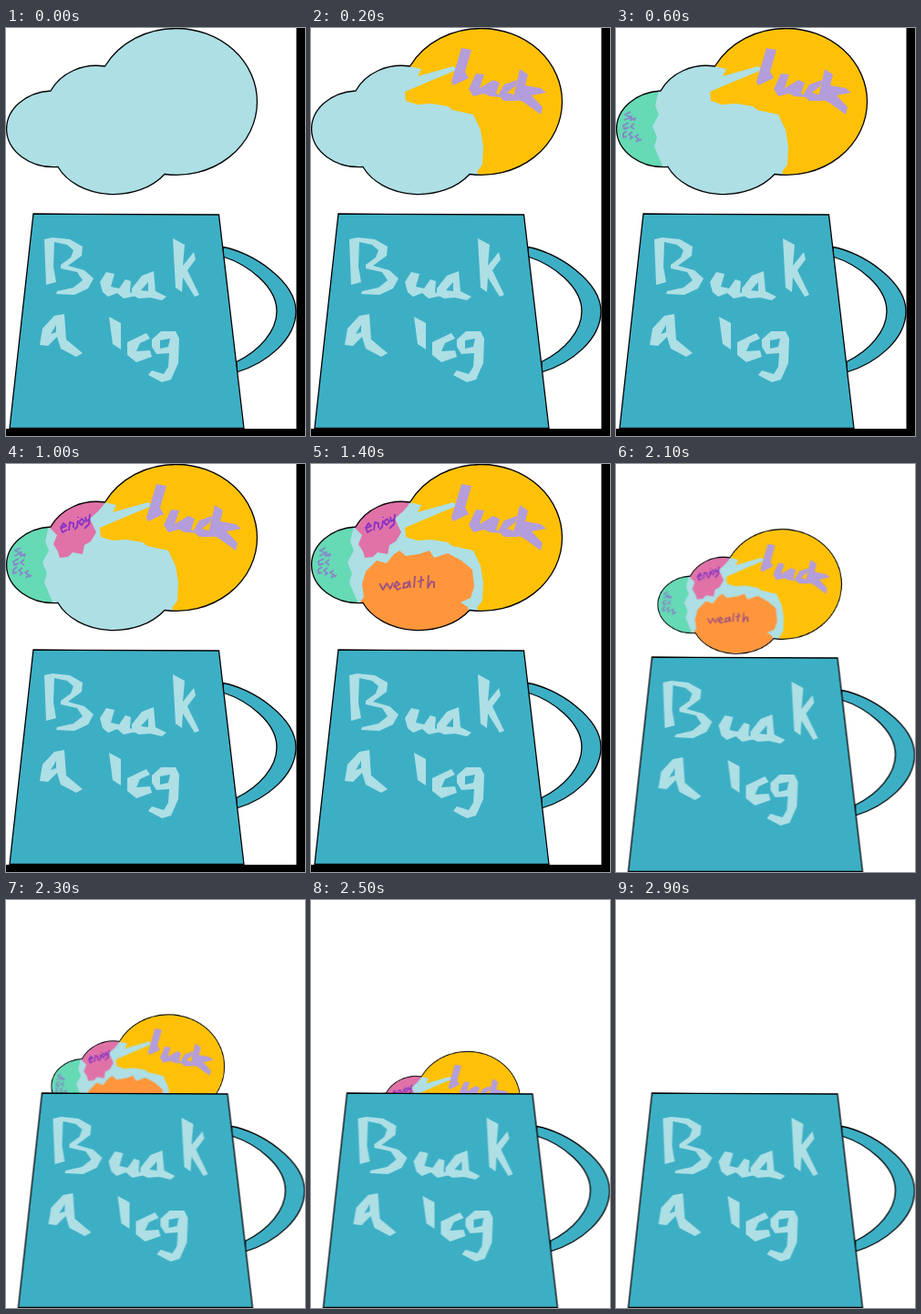
An HTML page without scripts that plays this animation: 328x448 px, repeating every 3100 ms.

```html
<!DOCTYPE html>
<html lang="en">
<head>
<meta charset="utf-8">
<title>Mug and cloud</title>
<style>
  html, body { margin: 0; width: 100%; height: 100%; overflow: hidden; background: #fff; }
  svg { display: block; width: 328px; height: 448px; }

  .line { fill: none; stroke: #000; stroke-width: 1.3; vector-effect: non-scaling-stroke; }
  .mug { fill: #3dafc5; stroke: #000; stroke-width: 1.3; }
  .pale { fill: #addfe5; }
  .pen { fill: none; stroke-width: 1.9; stroke-linejoin: round; }

  .cloud, .cup, .bars, .luck, .success, .enjoy, .wealth { animation: 3.1s step-end infinite; }
  .cloud { animation-name: sink; }
  .cup { animation-name: shift; }
  .bars { animation-name: bars; }
  .luck { animation-name: luck; }
  .success { animation-name: success; }
  .enjoy { animation-name: enjoy; }
  .wealth { animation-name: wealth; }

  @keyframes luck { 0% { opacity: 0 } 6.451%, 100% { opacity: 1 } }
  @keyframes success { 0% { opacity: 0 } 19.354%, 100% { opacity: 1 } }
  @keyframes enjoy { 0% { opacity: 0 } 32.258%, 100% { opacity: 1 } }
  @keyframes wealth { 0% { opacity: 0 } 45.161%, 100% { opacity: 1 } }
  @keyframes bars { 0% { opacity: 1 } 61.29%, 100% { opacity: 0 } }
  @keyframes shift {
    0% { transform: translate(0, 0) }
    61.29%, 100% { transform: translate(9.5px, 8px) }
  }
  @keyframes sink {
    0% { transform: translate(0, 0) scale(1, 1) }
    61.29% { transform: translate(48px, 30.5px) scale(.733, .75) }
    67.741% { transform: translate(45.5px, 71.3px) scale(.733, .75) }
    74.193% { transform: translate(49.5px, 125.5px) scale(.69, .71) }
    80.645% { transform: translate(50.5px, 166px) scale(.65, .667) }
    87.096% { transform: translate(56px, 202.5px) scale(.6, .61) }
    93.548%, 100% { transform: translate(60px, 240px) scale(.55, .57) }
  }
</style>
</head>
<body>
<svg viewBox="0 0 328 448" role="img" aria-label="Buak a leg: luck, success, enjoy, wealth">
  <defs>
    <path id="puff" d="M49 69A56 50 0 0 1 108.5 42A88.5 80.5 0 0 1 187 .5A88.5 80.5 0 0 1 275.5 81A88.5 80.5 0 0 1 174 160.500A67 50 0 0 1 57 152.500A52 42 0 0 1 .6 111A52 42 0 0 1 49 69Z"/>
    <clipPath id="inside"><use href="#puff"/></clipPath>
  </defs>

  <g class="cloud">
    <use href="#puff" class="pale"/>
    <g clip-path="url(#inside)">
      <g class="luck">
        <path fill="#ffc107" d="M108 -5L108 42 121 45 117 53 156 42 160 46 124 61 103 70 104 80 116 84 132 83 150 86 155 90 178 95 186 112 189 130 188 150 182 158 186 166H280V-5Z"/>
        <path fill="#b39ddb" d="M165 22L176 24 169 48 173 55 156 63 154 59ZM181 50L190 51 185 66 200 57 207 60 203 72 210 76 196 75 190 72 178 75 173 67ZM212 62L226 57 224 64 215 71 232 76 227 80 212 80 205 74ZM229 45L238 51 235 63 252 66 258 71 242 74 254 87 252 95 234 82 222 76Z"/>
      </g>
      <g class="success">
        <path fill="#66d9b5" d="M-3 60H49L43 85 47 95 40 108 45 120 42 130 47 142 53 156H-3Z"/>
        <path class="pen" stroke="#8589c8" d="M16 92L10 95 16 98 9 101M17 96L16 101 21 99 20 102M14 104L8 107 9 111 14 109M20 105L16 108 20 111M12 113L8 116 8 120 12 119M18 114L14 117 18 120 15 122M25 117L21 119 25 122 22 125M28 122L25 124"/>
      </g>
      <g class="enjoy">
        <path fill="#e072a8" d="M46 68V38H109L107 45 101 52 92 60 99 75 93 85 86 89 84 99 73 97 68 102 59 103 57 96 52 88 56 78Z"/>
        <path class="pen" stroke="#8a35c4" d="M61 70L66 68 63 65 60 70 62 75 67 72M69 73L70 64 74 65 74 70M79 62L78 69 75 72M79 58V59M83 60L80 64 83 67 86 63 83 60M87 58L88 63 92 60M92 55L91 66 86 71"/>
      </g>
      <g class="wealth">
        <path fill="#ff963c" d="M50 157L58 146 56 132 60 118 72 106 83 109 90 100 97 95 104 101 118 99 130 95 135 103 150 98 165 106 177 116 179 135 175 147 164 152 172 157 176 185H50Z"/>
        <path class="pen" stroke="#a0527f" d="M75 131L79 138 83 131 87 137 90 130M92 135L97 132 94 129 91 134 95 138 99 136M107 130L102 131 101 136 106 135 108 129 109 136M114 123L113 136M121 123L120 136M117 129L124 127M129 122L128 136 132 129 135 130 135 136"/>
      </g>
    </g>
    <use href="#puff" class="line"/>
  </g>

  <g class="cup">
    <path class="mug" d="M238 240.500C270 246 318 278 318 311C318 342 286 368 253 378V366.500C278 354 297 333 297 311C297 284 266 260 238 251Z"/>
    <path class="mug" d="M30 204L80 204.300 233.500 205 261 439.500H4Z"/>
    <g class="pale" fill-rule="evenodd">
      <path d="M42 232L51 230 70 232 84 240 83 250 68 261 86 266 96 275 90 286 75 293 55 292 56 289 74 285 84 277 78 268 60 264 60 260 71 252 74 244 67 238 53 235 52 262 55 279 44 282Z"/>
      <path d="M103 279L110 268 119 270 115 284 124 286 131 276 137 278 136 290 143 294 129 297 122 291 112 295 106 290Z"/>
      <path d="M138 286L149 272 162 267 164 289 176 295 171 299 158 296 146 297 138 293ZM148 288L156 279 156 289Z"/>
      <path d="M183 231L196 238 194 261 206 246 208 254 199 266 212 293 207 295 194 274 193 290 186 285Z"/>
      <path d="M37 348L40 330 53 316 64 314 66 342 84 357 77 361 60 352 56 339 46 349ZM49 336L55 326 55 334Z"/>
      <path d="M113 317L126 324 126 353 117 347Z"/>
      <path d="M133 345L154 335 158 341 147 346 143 355 158 354 160 361 143 367 133 359Z"/>
      <path d="M160 342L170 333 186 333 190 341 189 368 181 386 171 389 156 381 160 376 173 380 178 372 179 357 165 358 160 350ZM169 343L180 341 178 350 169 352Z"/>
    </g>
  </g>

  <path class="bars" d="M318.500 0H328V448H0V440H318.500Z"/>
</svg>
</body>
</html>
```
